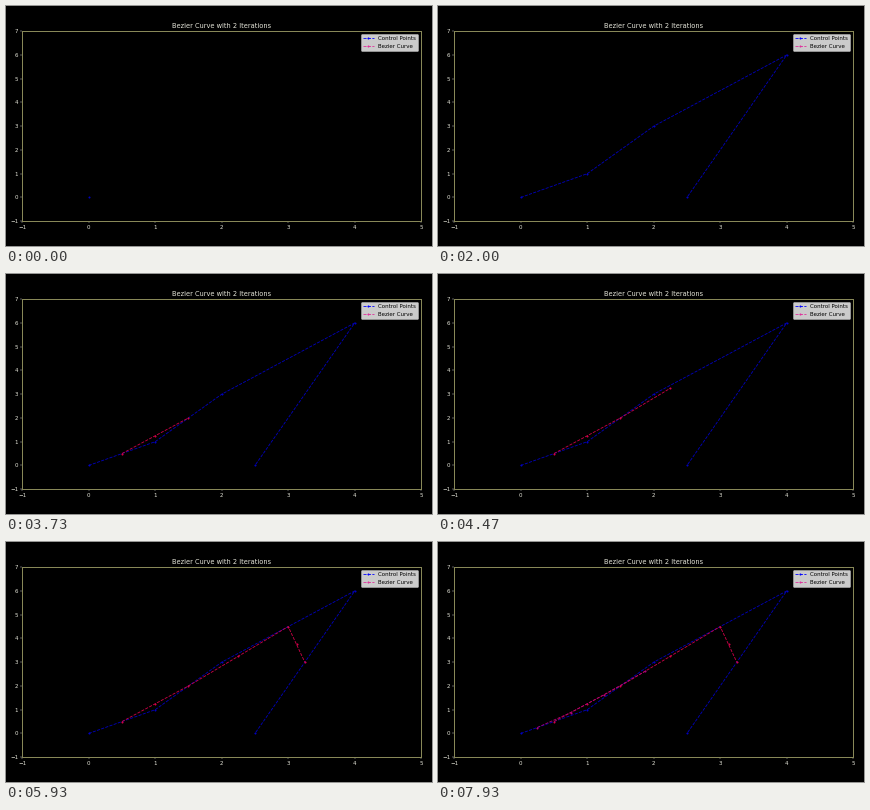
A matplotlib script that plays this animation: 426 px wide and 240 px high, repeating every 8 s.

```python
import numpy as np
import matplotlib.pyplot as plt
from matplotlib.animation import FuncAnimation

W, H, DPI = 426, 240, 40
STEP = 500  # ms per added point
BLUE, RED, PURPLE = "#0000c0", "#d00048", "#b00078"
FRAME, TEXT = "#888858", "#e4e4d8"

plt.rcParams["font.family"] = "DejaVu Sans"


def midpoints(p):
    return (p[:-1] + p[1:]) / 2


def interleave(a, b):
    out = np.empty((len(a) + len(b), 2))
    out[::2], out[1::2] = a, b
    return out


control = np.array([(0, 0), (1, 1), (2, 3), (4, 6), (2.5, 0)], float)
mids = midpoints(control)
first = interleave(mids, midpoints(mids))
second = midpoints(np.vstack([control[:1], first, control[-1:]]))

fig = plt.figure(figsize=(W / DPI, H / DPI), dpi=DPI, facecolor="black")
ax = fig.add_axes([16.2 / W, 1 - 215.2 / H, 399 / W, 190 / H], facecolor="black")
ax.set_xlim(-1, 5)
ax.set_ylim(-1, 7)
ax.set_title("Bezier Curve with 2 Iterations", color=TEXT, fontsize=12)
ax.tick_params(color="#c8c8c8", labelcolor=TEXT, labelsize=10)
for spine in ax.spines.values():
    spine.set_color(FRAME)
    spine.set_linewidth(72 / DPI)  # one pixel


def add_line(color, label=None):
    return ax.plot([], [], "o--", color=color, ms=3, lw=1.5, mew=0.5,
                   label=label)[0]


stages = [
    (add_line(BLUE, "Control Points"), control),
    (add_line(RED, "Bezier Curve"), first),
    (add_line(PURPLE), second),
]
legend = ax.legend(loc="upper right", fontsize=10, facecolor="white",
                   edgecolor="#cccccc", framealpha=0.8)
for handle, color in zip(legend.get_lines(), ("#0000ff", "#e0309c")):
    handle.set_color(color)


def update(i):
    shown = i + 1
    for line, pts in stages:
        n = min(max(shown, 0), len(pts))
        line.set_data(pts[:n, 0], pts[:n, 1])
        shown -= len(pts)
    return [line for line, _ in stages]


anim = FuncAnimation(fig, update, frames=16, interval=STEP, repeat=True,
                     repeat_delay=0, blit=False)
plt.show()
```
